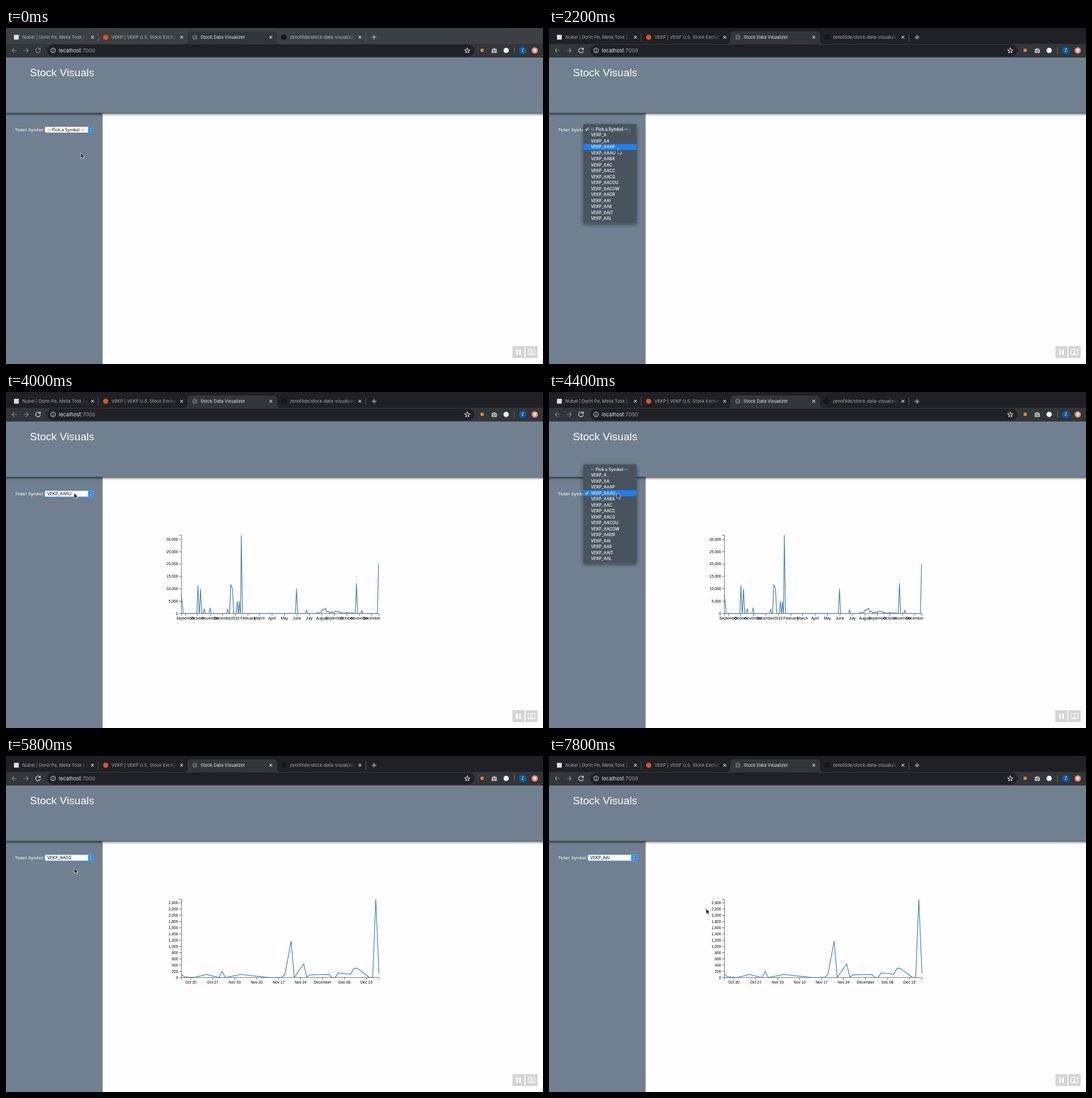
An HTML page that plays this animation: 947 px wide and 592 px high, repeating every 8000 ms.

```html
<!DOCTYPE html>
<html lang="en">
<head>
<meta charset="utf-8">
<title>Stock Data Visualizer</title>
<style>
  html, body { margin: 0; width: 100%; height: 100%; overflow: hidden; background: #fefefe; }
  svg { display: block; width: 100%; height: 100%; --strip: #202124; --tab: #a3a8ad; --icon: #e8eaed; }
  svg.blurred { --strip: #3c4043; --tab: #b4b8bc; --icon: #8b9095; }
  text { font-family: Inter, Roboto, sans-serif; font-variant-ligatures: none; font-feature-settings: "calt" 0; white-space: pre; }
  .strip { fill: var(--strip); }
  .tab { font-size: 7.85px; fill: var(--tab); }
  .page, .axis text { font-family: "Liberation Sans", Arial, sans-serif; fill: #fff; }
  .axis text { font-size: 6.7px; fill: #000; }
  .axis path { stroke: #333; stroke-width: .7; fill: none; }
  .series { fill: none; stroke: steelblue; stroke-width: 1.25; }
  .line { fill: none; stroke: var(--icon); stroke-width: 1.1; }
  .dim { stroke: #82878c; }
  .soft { stroke: #d5d7d9; }
  .menu text { font-size: 7.2px; font-weight: 500; fill: #fff; }
  #header { filter: drop-shadow(0 1px 2.5px #000); }
  #panel { filter: drop-shadow(0 2px 3px #0007); }
  #cursor { filter: drop-shadow(0 .5px .6px #0006); }
</style>
</head>
<body>
<svg id="stage" viewBox="0 0 947 592">
  <defs>
    <linearGradient id="fade">
      <stop offset="0" style="stop-color:var(--strip);stop-opacity:0"/>
      <stop offset=".9" style="stop-color:var(--strip)"/>
    </linearGradient>
  </defs>

  <rect width="947" height="592" fill="#fefefe"/>
  <rect y="140" width="170.4" height="452" fill="#708090"/>
  <rect id="header" x="-10" y="40" width="967" height="109.7" fill="#708090"/>
  <text class="page" x="42" y="84.7" font-size="19">Stock Visuals</text>

  <g id="browser">
    <rect class="strip" width="947" height="29"/>
    <g id="tabs"></g>
    <rect y="28" width="947" height="24" fill="#323639"/>
    <path d="M314 28q6 0 6-6V12q0-6 6-6H472q6 0 6 6V22q0 6 6 6z" fill="#323639"/>
    <circle cx="333" cy="16.3" r="4" stroke="#777c80" fill="#5b6064"/>
    <path d="M330 14.5l3 1 1 2.5-1 2M334 13l2 2" fill="none" stroke="#383c3f"/>
    <text class="tab" x="343" y="19.2" style="fill:#e6e8ea">Stock Data Visualizer</text>
    <g id="closers"></g>
    <path class="line soft" d="M645 16.3h8M649 12.3v8"/>

    <rect x="72.5" y="29.2" width="753.5" height="20.7" rx="10.3" fill="#202124"/>
    <path class="line dim" d="M19 39.5h-8.5m4-4-4 4 4 4M31 39.5h8.5m-4-4 4 4-4 4"/>
    <path class="line" d="M60 37a4.2 4.2 0 1 0 .6 3.5M60.5 34.8V38H57"/>
    <circle class="line soft" cx="83" cy="39.5" r="4"/>
    <path d="M83 37v1M83 39v3" stroke="#e0e2e4"/>
    <text x="93" y="42.9" font-size="9.2" fill="#e8eaed">localhost<tspan fill="#9aa0a6">:7000</tspan></text>
    <path class="line soft" d="M813.5 35.2l1.3 2.9 3.2.3-2.4 2.1.7 3.1-2.8-1.7-2.8 1.7.7-3.1-2.4-2.1 3.2-.3z"/>
    <rect x="837" y="36.5" width="5.5" height="5.5" fill="#e8823e"/>
    <path d="M856.5 37h2.3l1-1.5h2.4l1 1.5h2.3v7h-9z" fill="#b9bdc1"/>
    <circle cx="861" cy="40.3" r="1.8" fill="#b9bdc1" stroke="#323639" stroke-width=".8"/>
    <circle cx="882" cy="39.5" r="4.7" fill="#f4f5f6"/>
    <path d="M896.5 34v11" stroke="#5f6368"/>
    <circle cx="911.3" cy="39.5" r="6.6" fill="#0b5aa2"/>
    <text x="911.3" y="42.3" font-size="7.5" fill="#dbe8f5" text-anchor="middle">Z</text>
    <circle cx="932.5" cy="39.5" r="5.5" fill="#f28b82"/>
    <path d="M932.5 36l3 3.5h-1.9v3h-2.2v-3h-1.9z" fill="#fff"/>
  </g>

  <text class="page" x="15.7" y="181.7" font-size="7.9">Ticker Symbol</text>
  <g id="select">
    <rect id="ring" x="67.7" y="173.3" width="87.6" height="11.9" rx="2.5" fill="#4b9bf0"/>
    <rect x="68.7" y="174.2" width="85.6" height="10" rx="1.8" fill="#fff"/>
    <path d="M145 174.2h7.5q1.8 0 1.8 1.8v6.4q0 1.8-1.8 1.8H145z" fill="#2f80ee"/>
    <path d="M147.9 178l1.7-1.8 1.7 1.8m-3.4 2.5 1.7 1.8 1.7-1.8" fill="none" stroke="#fff" stroke-width=".9"/>
    <text id="value" x="72.7" y="181.8" font-size="7.25"></text>
  </g>

  <g id="charts"></g>

  <g fill="#d5d5d5">
    <rect x="893" y="560.5" width="21.5" height="21"/>
    <rect x="916" y="560.5" width="21.5" height="21"/>
    <path d="M899.5 566.5h3v9.5h-3zm5.500 0h3v9.5h-3z" fill="#fff"/>
    <rect x="921" y="566.5" width="11.5" height="9" stroke="#fff" fill="none"/>
    <circle cx="926.7" cy="570" r="1.6" fill="#fff"/>
    <path d="M923 575.5q.5-3 3.7-3t3.7 3z" fill="#fff"/>
  </g>

  <g id="menu" class="menu">
    <rect id="panel" x="60.3" width="94.4" height="174.5" rx="3" fill="#48535d" stroke="#5e6974" stroke-width=".6"/>
    <rect x="68" y="174" width="77" height="10" fill="#fff" opacity=".06"/>
    <rect id="hover" x="60.6" width="93.8" height="10.52" fill="#1f7fee"/>
    <path d="M64.3 178.4l1.8 2.2 3.3-5" fill="none" stroke="#fff" stroke-width="1.2"/>
    <g id="items"></g>
  </g>
  <path id="cursor" d="M0 0V9.3L2.2 7.3 3.7 10.7 5.4 10 3.9 6.7H6.8Z" fill="#0c0c0c" stroke="#fff" stroke-width=".8"/>
</svg>

<script>
const $ = id => document.getElementById(id);
const put = (id, html) => { $(id).innerHTML = html; };
const show = (id, on) => { $(id).style.display = on ? '' : 'none'; };

// Browser tabs, one every TAB pixels; the active one is part of the markup
const TAB = 157.2;
const tabs = ['Nubel | Dorin Pe, Melia Tosk | Al', 'VEKP | VEKP U.S. Stock Exchan', '',
  'zenofilde/stock-data-visualizer'];
put('tabs', tabs.map((label, i) => label && `<g transform="translate(${i * TAB})">
    <text class="tab" x="28.8" y="19.2">${label}</text>
    <rect x="130" y="8" width="16" height="18" fill="url(#fade)"/>
    <rect class="strip" x="145" y="8" width="18" height="18"/>
  </g>`).join('') +
  `<rect x="14" y="12" width="8.5" height="8.5" fill="#e3d6e6"/>
   <circle cx="175.8" cy="16.3" r="4.6" fill="#d9532f"/>
   <circle cx="490" cy="16.3" r="5" fill="#15171a"/>
   <path d="M162.5 10v13M634.5 10v13" stroke="#5f6368" stroke-width=".8"/>`);
put('closers', tabs.map((_, i) =>
  `<path class="line soft" d="M${150.1 + i * TAB} 13.9l4.8 4.8m0-4.8-4.8 4.8"/>`).join(''));

// Drop-down menu
const ROW = 10.52;
const symbols = 'A AA AAAP AAAU AABA AAC AACC AACG AACOU AACOW AADR AAI AAII AAIT AAL';
const options = ['-- Pick a Symbol --', ...symbols.split(' ').map(s => 'VEKP_' + s)];
put('items', options.map((s, i) => `<text x="74" y="${2.6 + i * ROW}">${s}</text>`).join(''));

// Charts
const LEFT = 309.3, RIGHT = 657.7, TOP = 252.3, BASE = 390.3;

function chart(id, max, step, xTicks, data) {
  const toY = v => BASE - v / max * (BASE - TOP);
  let axis = `M305 ${TOP}H${LEFT}V${BASE}M${LEFT} ${BASE + 4}V${BASE}H${RIGHT}v4`, labels = '';
  for (let v = 0; v <= max; v += step) {
    axis += `M305.3 ${toY(v)}h4`;
    labels += `<text x="303.5" y="${toY(v) + 2.2}" text-anchor="end">${v.toLocaleString('en-US')}</text>`;
  }
  for (const [x, label] of xTicks) {
    axis += `M${x} ${BASE}v4`;
    labels += `<text x="${x}" y="400.6" text-anchor="middle">${label}</text>`;
  }
  const points = data.map(([x, v]) => `${x},${toY(v)}`).join(' ');
  return `<g id="${id}"><g class="axis"><path d="${axis}"/>${labels}</g>
    <polyline class="series" points="${points}"/></g>`;
}

const DAY = 864e5;
const format = (date, month) => date.toLocaleString('en-US', { month, timeZone: 'UTC' });
const months = Array.from({ length: 16 }, (_, i) => {
  const date = new Date(Date.UTC(2018, 8 + i));
  const x = 316.5 + (date - Date.UTC(2018, 8)) / DAY * .7204;
  return [x, date.getUTCMonth() ? format(date, 'long') : date.getUTCFullYear()];
});
const weeks = Array.from({ length: 9 }, (_, i) => {
  const date = new Date(Date.UTC(2019, 9, 20 + 7 * i)), day = date.getUTCDate();
  return [326 + 38.7 * i, day === 1 ? format(date, 'long') : `${format(date, 'short')} ${String(day).padStart(2, 0)}`];
});

// A flat year with a few spikes [x, volume] and a restless late summer
let seed = 7;
const random = () => (seed = seed * 16807 % 2147483647) / 2147483647;
const spikes = [[309, 7600], [310.6, 5000], [338.5, 11500], [343, 10000], [349.5, 2000], [360, 2300], [391, 1800],
  [396.3, 11800], [399.5, 10000], [408, 5000], [411.5, 5000], [415, 31700], [512.3, 10000], [530, 1400],
  [618, 12300], [627.5, 1200], [657, 20000]];
const yearly = spikes.flatMap(([x, v]) => [[x - 2, 0], [x, v], [x + 2, 0]])
  .filter(([x, v]) => v || x > LEFT && x < RIGHT && !spikes.some(([s]) => Math.abs(s - x) < 1.5));
for (let x = 547; x < 612; x += 1.4) {
  const swell = 500 + 2300 * Math.exp(-(((x - 562) / 6) ** 2)) + 700 * Math.exp(-(((x - 583) / 6) ** 2));
  yearly.push([x, swell * random()]);
}
yearly.sort((a, b) => a[0] - b[0]);

// Daily volumes by day number
const daily = { 0: 100, 1: 20, 4: 0, 8: 100, 12: 0, 13: 200, 14: 0, 19: 100, 28: 0, 32: 0, 33: 100, 35: 1170, 36: 0,
  39: 440, 40: 10, 41: 85, 47: 100, 48: 0, 49: 0, 50: 150, 54: 105, 55: 295, 56: 300, 60: 0, 61: 0, 62: 2520, 63: 130 };
const weekly = Object.entries(daily).map(([day, v]) => [LEFT + day * (RIGHT - LEFT) / 63, v]);

put('charts', chart('yearly', 31700, 5000, months, yearly) + chart('weekly', 2520, 200, weeks, weekly));

// Timeline
const glides = [
  { from: 200, until: 1200, x: 126, y: 180 },
  { from: 1600, until: 2600, x: 121, y: 219 },
  { from: 2800, until: 3800, x: 120, y: 178 },
  { from: 4400, until: 5600, x: 113.3, y: 220 },
  { from: 5600, until: 6200, x: 126, y: 180 },
  { from: 6400, until: 7200, x: 118, y: 219 },
  { from: 7400, until: 7800, x: 277, y: 269 }
];
const picks = [
  { open: 1600, close: 2800, option: 4, chart: 'yearly' },
  { open: 4400, close: 5600, option: 8, chart: 'weekly' },
  { open: 6200, close: 7600, option: 12, chart: 'weekly' }
];
const FOCUS = 800, LOAD = 200;

function pointerAt(t) {
  let x = 132, y = 220;
  for (const g of glides) {
    const p = Math.min(1, Math.max(0, (t - g.from) / (g.until - g.from)));
    const ease = 1 - (1 - p) ** 2;
    x += (g.x - x) * ease;
    y += (g.y - y) * ease;
  }
  return [x, y];
}

function draw(t) {
  const [x, y] = pointerAt(t);
  const choice = picks.filter(p => p.close <= t).pop()?.option ?? 0;
  const loaded = picks.filter(p => p.close + LOAD <= t).pop()?.chart;
  const open = picks.some(p => p.open <= t && t < p.close);
  $('stage').classList.toggle('blurred', t < FOCUS);
  $('cursor').setAttribute('transform', `translate(${x} ${y})`);
  $('value').textContent = options[choice];
  show('ring', choice > 0);
  for (const id of ['yearly', 'weekly']) show(id, id === loaded);
  show('menu', open);

  // The menu opens with the chosen row over the select box
  const first = 178.1 - choice * ROW;
  const row = Math.round((y - first) / ROW);
  $('panel').setAttribute('y', first - 8.5);
  $('hover').setAttribute('y', first + (row - .5) * ROW);
  $('items').setAttribute('transform', `translate(0 ${first})`);
}

const STEP = 200, LOOP = 8000, start = performance.now();
function tick(now) {
  const t = Math.max(0, now - start) % LOOP;
  draw(Math.floor(t / STEP) * STEP);
  requestAnimationFrame(tick);
}
draw(0);
requestAnimationFrame(tick);
</script>
</body>
</html>
```
